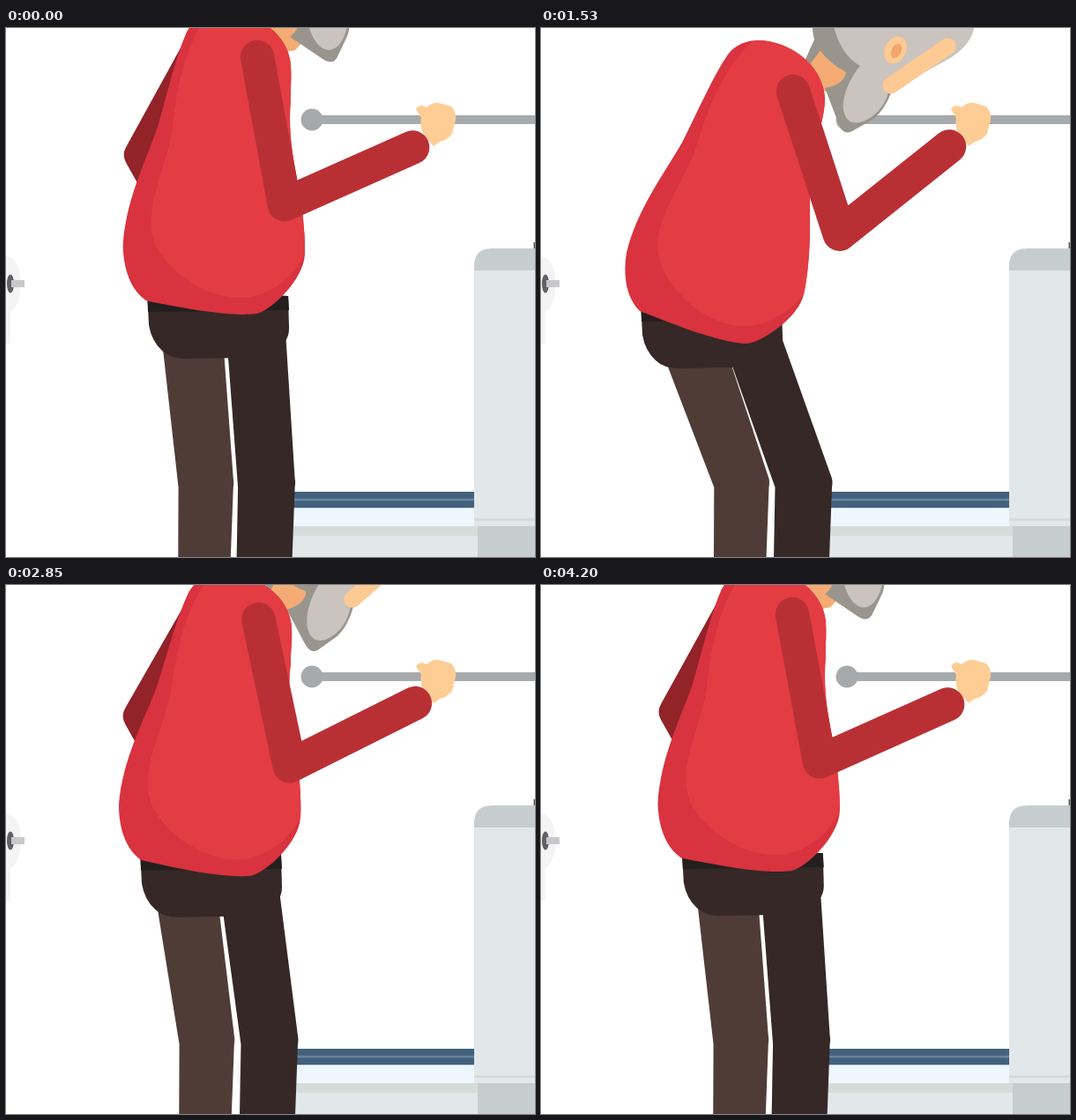
Animation of 600 by 600 pixels, one loop 4230 ms. Source, as an HTML page:

```html
<!DOCTYPE html>
<html lang="en">
<head>
<meta charset="utf-8">
<title>Man at the rail</title>
<style>
html, body { margin: 0; width: 100%; height: 100%; overflow: hidden; background: #fff; }
svg { display: block; width: 100%; height: 100%; }
.arm { fill: none; stroke-linecap: round; stroke-linejoin: round; }
</style>
</head>
<body>
<svg viewBox="0 0 600 600">
  <!-- room -->
  <path fill="#f4f4f4" d="M0 259C9 259 17 272 17 290S9 321 5 321V358H0Z"/>
  <ellipse cx="5" cy="290" rx="4" ry="10.5" fill="#616163"/>
  <path fill="#c6c8c9" d="M6 286H21V294H6Z"/>
  <path fill="#43617d" d="M269 526H531V544.6H269Z"/>
  <path fill="#6984a0" d="M269 533.7H531V536.2H269Z"/>
  <path fill="#eef7fe" d="M262 544.6H531V565H262Z"/>
  <path fill="#d5dddb" d="M272 565H536V576H272Z"/>
  <path fill="#e2e7ea" d="M272 576H536V600H272Z"/>
  <path fill="#c5cdcf" d="M535 565H600V600H535Z"/>
  <path fill="#e2e7ea" d="M531 275H600V565H531Z"/>
  <path fill="#d5dadc" d="M531 556H600V559H531Z"/>
  <path fill="#c5cdcf" d="M531 275V270Q531 250 551 250H600V275Z"/>
  <path fill="#58595b" d="M598.5 243H600V250H598.5Z"/>
  <path fill="#a7aaac" d="M347 99H600V109H347Z"/>
  <circle cx="347" cy="104" r="12.5" fill="#a7aaac"/>

  <!-- legs and hips -->
  <path id="backLeg" fill="#503c37"/>
  <path id="frontLeg" fill="#352826"/>
  <g id="hips">
    <path fill="#352826" d="M113 308L115 348Q118 366 130 377Q139 386 157 386L217 385L268 368Q274 362 274 352L273 315Z"/>
    <path fill="#241f1f" d="M113 308L114 333L274 331L273 315Z"/>
  </g>

  <path id="farArm" class="arm" stroke="#922329" stroke-width="36"/>

  <g id="torso">
    <path fill="#f4ac74" d="M296 44L318 10L352 30L345 60L330 72L318 72Z"/>
    <path fill="#99958c" d="M311 11L296 44L303 44L318 24Z"/>
    <g id="head">
      <path fill="#99958c" d="M303 -70L308 2Q309 16 316 25Q328 41 346 50Q344 64 322 68L337 107Q342 122 352 117.5L376 104Q389 94 397 74L380 -70Z"/>
      <path fill="#cac3be" d="M325 -70L333 2Q342 32 362 43C350 57 341 78 343 93Q346 110 362 107C379 102 390 88 394 73L466 33Q488 18 491 0Q498 -40 460 -70Z"/>
      <path fill="none" stroke="#fdca93" stroke-width="19" stroke-linecap="round" d="M397 65L461 21"/>
      <ellipse cx="402" cy="25" rx="12" ry="16" fill="#fdca93" transform="rotate(28 402 25)"/>
      <ellipse cx="403" cy="26" rx="5.5" ry="8.5" fill="#f2a56c" transform="rotate(28 403 26)"/>
    </g>
    <path id="jumper" fill="#d8333f"/>
    <path id="light" fill="#e33d43"/>
  </g>

  <path fill="#fecd95" d="M465 92Q470 85 477 90Q484 84 491 85L505 89Q511 95 510 104L506 120Q501 127 492 129L485 134L474 122Q469 112 471 102Z"/>
  <path id="nearArm" class="arm" stroke="#b93034" stroke-width="38.5"/>
</svg>
<script>
const LOOP = 4230, STEP = 30, RAD = Math.PI / 180;
const el = id => document.getElementById(id);
const set = (id, name, value) => el(id).setAttribute(name, value);

// Tracks of [time, value]; turning points are eased.
const shoulderY = [[0, 33], [510, 67], [1050, 78], [1530, 72], [2070, 42], [2520, 30], [3150, 52], [3550, 65], [LOOP, 33]];
const headLift = [[0, 35], [510, 7], [1050, 4], [1530, 0], [2070, 5], [2520, 10], [3150, 3], [3500, 2], [LOOP, 35]];
const sway = [[0, -2.4], [510, 0], [1530, 0], [2070, 2.5], [2520, 5], [3150, -2.5], [LOOP, -2.4]];
const farSwing = [[0, 28.8], [510, 50], [680, 53], [1400, 22], [1530, 24], [1850, 45], [2070, 39.8], [2520, 23], [3150, 40], [3400, 47], [LOOP, 28.8]];

function slope(keys, i) {
  const [a, b] = [keys[i], keys[i + 1]];
  return a && b ? (b[1] - a[1]) / (b[0] - a[0]) : 0;
}

function tangent(keys, i) {
  const p = slope(keys, i - 1), q = slope(keys, i);
  return p * q > 0 ? 2 * p * q / (p + q) : 0;
}

function at(keys, t) {
  const i = keys.findIndex(k => k[0] > t) - 1;
  const [t0, v0] = keys[i], [t1, v1] = keys[i + 1];
  const d = t1 - t0, u = (t - t0) / d, w = 1 - u;
  return v0 * w * w * (1 + 2 * u) + v1 * u * u * (3 - 2 * u)
    + d * u * w * (w * tangent(keys, i) - u * tangent(keys, i + 1));
}

// Elbow of a two-part limb reaching from (x, y) to (hx, hy), bent downwards.
function elbow(x, y, hx, hy, upper, lower) {
  const dx = hx - x, dy = hy - y, r = Math.hypot(dx, dy);
  const a = Math.atan2(dy, dx) + Math.acos((upper * upper + r * r - lower * lower) / (2 * upper * r));
  return [x + upper * Math.cos(a), y + upper * Math.sin(a)];
}

const front = "M247 14C285 15 322 45 322 82C321 100 317 110 314 128C304 165 305 195 305 225C305 255 302 285 298 302";
set("jumper", "d", front + "C292 329 250 357 232 358C200 356 150 336 112 321C96 305 93 280 97 255C109 205 140 165 160 130C180 90 195 55 212 30C221 18 234 14 247 14Z");
set("light", "d", front + "C275 330 250 338 228 338C190 337 147 303 134 262C123 222 163 175 176 135C188 95 206 45 240 15Z");

function draw(t) {
  const y = at(shoulderY, t), k = at(sway, t), lift = at(headLift, t);
  const x = 286 + k * .4, rise = 72 - y;
  const hx = 1.05 * rise + .004 * rise * rise, hy = -.28 * rise;

  const leg = (id, left, right, knee, foot, shift) => set(id, "d",
    `M${left} ${340 + hy}H${right}L${knee[1] + shift} 511Q${knee[1] + 1 + shift} 515 ${knee[1] + shift} 521` +
    `L${foot[1] + shift} 602H${foot[0] + shift}L${knee[0] + shift} 521Z`);
  leg("backLeg", 127 + hx, 202 + hx * .9, [196.3, 258.5], [196, 255.5], k * .3);
  leg("frontLeg", 201.6 + hx, 269 + hx, [265.5, 330], [264, 327], k);
  set("hips", "transform", `translate(${hx} ${hy})`);

  set("torso", "transform", `translate(${x - 286} ${-rise}) rotate(${-rise * .27} 286 72)`);
  // The head's angle is independent of the lean of the back.
  const slide = lift * -.25;
  set("head", "transform", `rotate(${rise * .27} 325 40) translate(${slide} ${slide}) rotate(${-lift} 325 40)`);

  const swing = at(farSwing, t) * RAD, fx = x - 59, fy = y - 24;
  const ex = fx - 154 * Math.sin(swing), ey = fy + 154 * Math.cos(swing);
  set("farArm", "d", `M${fx} ${fy}L${ex} ${ey}l37 66`);

  const wx = 463 + k * .8, wy = 134.5 - k * .4;
  set("nearArm", "d", `M${x} ${y}L${elbow(x, y, wx, wy, 170, 159)}L${wx} ${wy}`);
}

const start = performance.now();
function tick() {
  const t = (performance.now() - start) % LOOP;
  draw(Math.floor(t / STEP) * STEP);
  requestAnimationFrame(tick);
}
tick();
</script>
</body>
</html>
```
